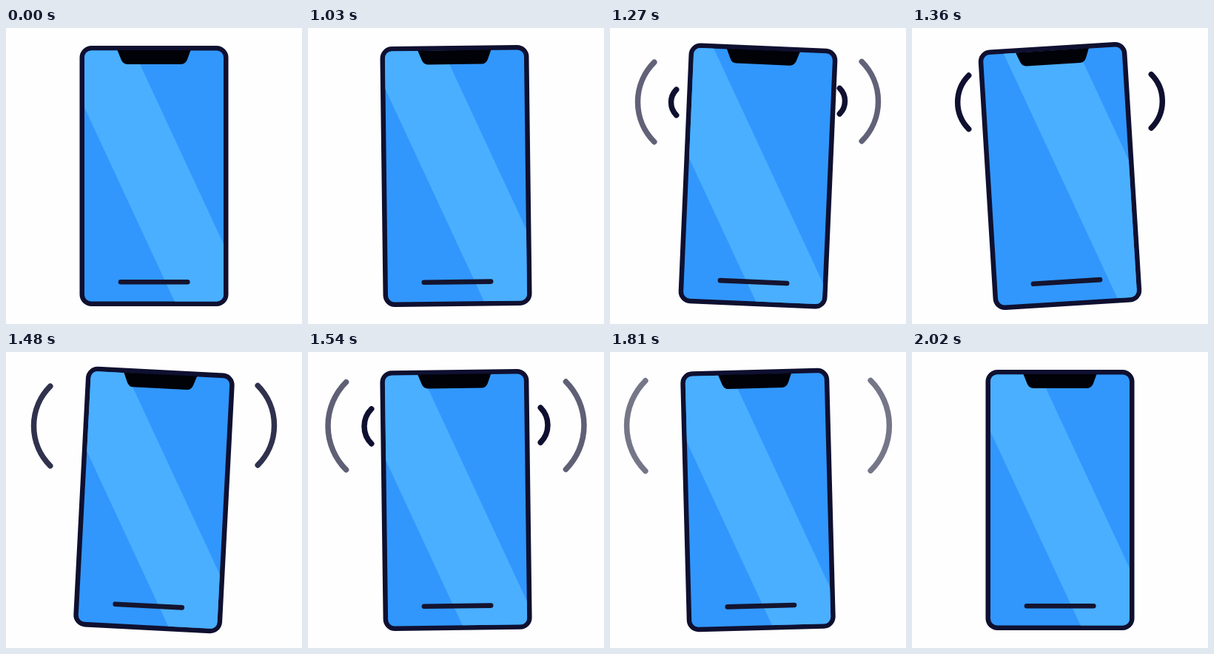
Recreate the animation shown at these times as an HTML page. Size 400 px wide and 400 px high, loop 2080 ms.

```html
<!DOCTYPE html>
<html lang="en">
<head>
<meta charset="utf-8">
<title>Ringing phone</title>
<style>
  html, body { margin: 0; width: 100%; height: 100%; overflow: hidden; background: #fefefe; }
  svg { display: block; width: 100%; height: 100%; }
</style>
</head>
<body>
<svg viewBox="0 0 400 400">
  <defs>
    <clipPath id="screen">
      <rect class="tilt" x="106" y="30.5" width="188" height="339" rx="9"/>
    </clipPath>
  </defs>
  <g id="waves" fill="none" stroke="#0f1030" stroke-width="7.5" stroke-linecap="round"></g>
  <g class="tilt">
    <rect x="99.5" y="24" width="201" height="352" rx="16" fill="#0f1030"/>
    <rect x="106" y="30.5" width="188" height="339" rx="9" fill="#3197fd"/>
  </g>
  <g clip-path="url(#screen)">
    <path id="shine" d="M56 0H158.2L344.2 400H242Z" fill="#4aafff"/>
  </g>
  <g class="tilt">
    <path d="M150.5 30L155.5 42.5Q158 49 164 49H236.5Q242.5 49 245 42.5L249.5 30Z" fill="#010108"/>
    <path d="M155 343.2H245.3" stroke="#14142f" stroke-width="6.6" stroke-linecap="round"/>
  </g>
</svg>
<script>
const LOOP = 2080, REST = 1030, STEP = 30, LAST = 34;
const SPREAD = 14;    // steps a wave takes to reach full size
const FADE_AGE = 6.6; // age at which it starts to fade

// Birth and fade length, in steps
const waves = [
  { born: 1, fade: 4 },
  { born: 8, fade: 10 },
  { born: 16.1, fade: 10 }
];

const ease = u => (1 - Math.cos(Math.PI * u)) / 2;
const clamp = v => Math.max(0, Math.min(1, v));

// Eased swing between alternating peaks that shrink to nothing
function swing(k, beat, high, low) {
  const peak = i => i === 0 ? 0 : (1 - i / 10) * (i % 2 ? high : low);
  const i = Math.floor(k / beat);
  return peak(i) + (peak(i + 1) - peak(i)) * ease(k / beat - i);
}

const tilted = document.querySelectorAll('.tilt');
const shine = document.getElementById('shine');
const layer = document.getElementById('waves');
for (const wave of waves) {
  wave.path = document.createElementNS('http://www.w3.org/2000/svg', 'path');
  layer.appendChild(wave.path);
}

// Quarter circle bulging away from the phone; side is -1 left, 1 right
function arc(side, edge, r, y) {
  const h = r * Math.SQRT1_2;
  const x = 200 + side * (200 - edge - r + h);
  return `M${x} ${y - h}A${r} ${r} 0 0 ${side > 0 ? 1 : 0} ${x} ${y + h}`;
}

function drawWave({ path, born, fade }, k) {
  const age = k - born;
  const a = Math.max(0, Math.min(SPREAD, age));
  const r = 90 - 76 * (1 - a / SPREAD) ** 2;
  const edge = 90 - 7.6 * a + 0.13 * a * a;
  const skew = 1 - a / SPREAD;
  path.setAttribute('d', arc(-1, edge, r, 99.6 + skew) + arc(1, edge, r, 99.6 - skew));
  path.setAttribute('opacity', age > 0 ? 1 - clamp((age - FADE_AGE) / fade) : 0);
}

function draw(time) {
  const t = time % LOOP;
  const k = t < REST ? 0 : (Math.floor((t - REST) / STEP) + 1);
  const pose = k < LAST ? k : 0;
  const turn = `rotate(${swing(pose, 3.9, -5.2, 5.2)} 200 200)`;
  tilted.forEach(el => el.setAttribute('transform', turn));
  shine.setAttribute('transform', `translate(${swing(pose, 4.3, 88, -41)} 0)`);
  waves.forEach(wave => drawWave(wave, pose));
}

const start = performance.now();
function tick() {
  draw(performance.now() - start);
  requestAnimationFrame(tick);
}
tick();
</script>
</body>
</html>
```
